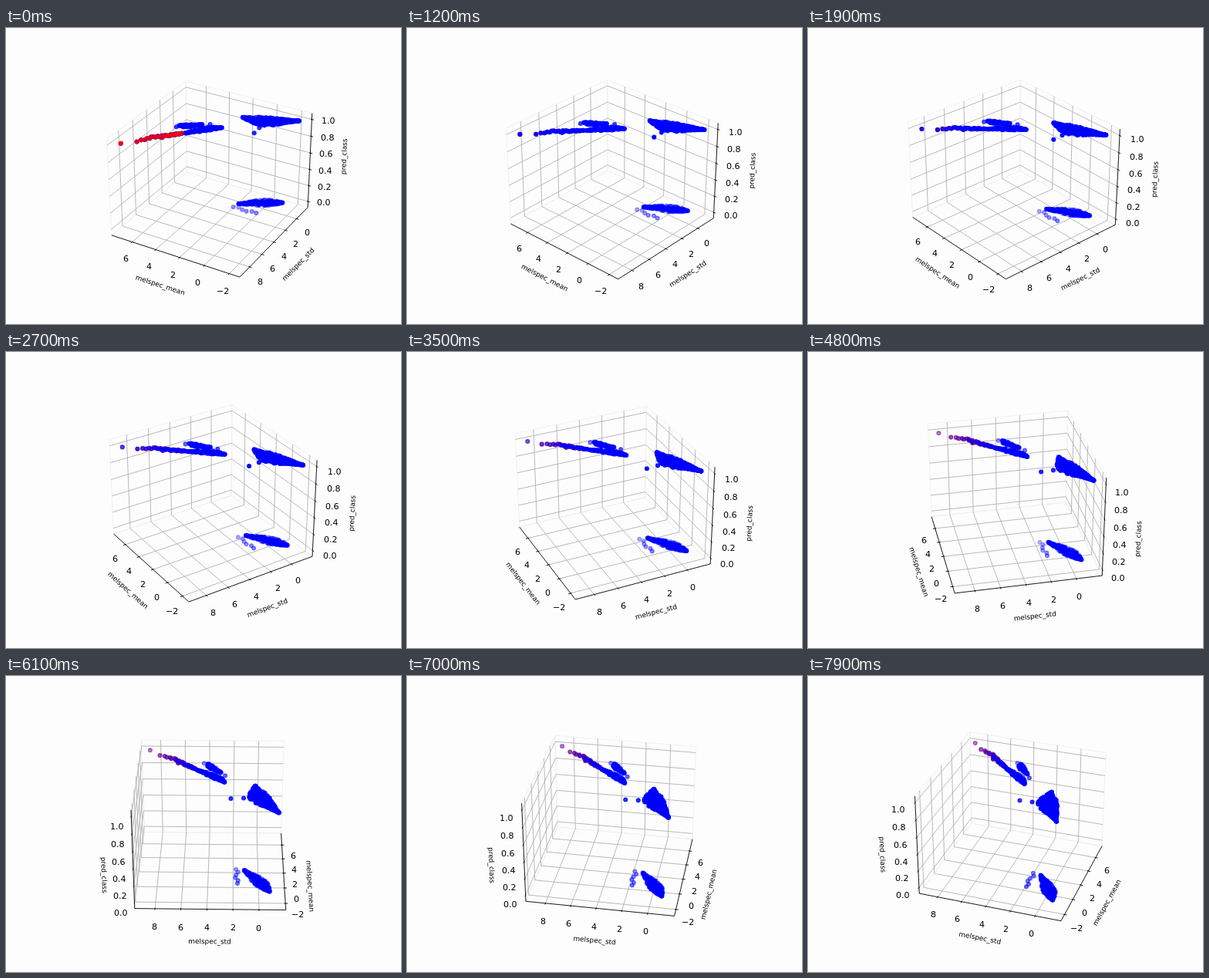
Write an HTML page with a canvas that moves like this. It is 512 px wide and 384 px high and loops after 8 s.

```html
<!DOCTYPE html>
<html lang="en">
<head>
<meta charset="utf-8">
<title>Rotating 3D scatter plot</title>
<style>
  html, body { margin: 0; width: 100%; height: 100%; overflow: hidden; background: #fdfdfd; }
  canvas { display: block; }
</style>
</head>
<body>
<canvas id="stage" width="512" height="384"></canvas>
<script>
const ctx = document.getElementById('stage').getContext('2d');
const FONT = '"DejaVu Sans", sans-serif';
const STEP = 100, STEPS = 80, START = 120;
const CENTER = [266.39, 189.93], SCALE = 1598.27, DIST = 10;
const ELEV = Math.PI / 6, SIN_E = Math.sin(ELEV), COS_E = Math.cos(ELEV);

// Half box sizes, box edge after padding, and one twelfth of each side
const HALF = [0.5714, 0.5714, 0.4286];
const EDGE = HALF.map(h => h * 25 / 24);
const DELTA = HALF.map(h => h / 6);
const TOP = HALF[2] / 1.1, REACH = HALF[0] / 1.1;

// flip: coordinate mirrored to reach the visible edge; out: direction of the tick marks
const AXES = [
  { label: 'melspec_mean', min: -2.615, max: 7.565, step: 2, digits: 0, flip: 1, out: 1 },
  { label: 'melspec_std', min: -1.83, max: 9.33, step: 2, digits: 0, flip: 0, out: 0 },
  { label: 'pred_class', min: -0.05, max: 1.05, step: 0.2, digits: 1, flip: 0, out: 0 }
];

let seed = 20;
function rand() {
  seed = (seed * 1664525 + 1013904223) >>> 0;
  return seed / 4294967296;
}

// Points spread along a line, fanning out sideways between low and high and closing at both ends
function streak({ count, from, to, low, high, z = TOP, pack = 1, skew = 1 }) {
  const dx = to[0] - from[0], dy = to[1] - from[1], len = Math.hypot(dx, dy);
  return Array.from({ length: count }, (_, i) => {
    const t = (i / (count - 1)) ** pack;
    const side = (low + (high - low) * rand()) * Math.sin(Math.PI * t ** skew) / len;
    return [from[0] + dx * t - dy * side, from[1] + dy * t + dx * side, z];
  });
}

const red = streak({ count: 36, from: [REACH, REACH], to: [0.19, 0.135], low: -0.026, high: 0.026, pack: 0.39 });

const blue = [
  ...red,
  ...streak({ count: 55, from: [0.28, 0.035], to: [0.13, -0.075], low: -0.036, high: 0.012, skew: 0.7 }),
  ...streak({ count: 100, from: [0.17, 0.12], to: [-0.035, -0.105], low: -0.016, high: 0.045, skew: 1.3 }),
  ...streak({ count: 300, from: [-REACH, -REACH], to: [-0.093, -0.347], low: -0.03, high: 0.12, skew: 1.3 }),
  ...streak({ count: 230, from: [-0.105, -0.27], to: [-0.42, -0.47], low: -0.042, high: 0.06, skew: 1.3, z: -TOP }),
  ...streak({ count: 6, from: [-0.094, -0.202], to: [-0.304, -0.214], low: -0.02, high: 0.04, z: -TOP }),
  // lone points
  [-0.302, -0.155, TOP], [-0.295, -0.254, TOP], [0.075, -0.108, TOP], [0.288, 0.065, TOP]
];

let cosA, sinA;

function project([x, y, z]) {
  const right = -sinA * x + cosA * y;
  const near = cosA * x + sinA * y;
  const depth = DIST - near * COS_E - z * SIN_E;
  const up = z * COS_E - near * SIN_E;
  return [CENTER[0] + SCALE * right / depth, CENTER[1] - SCALE * up / depth, depth];
}

function line(points, color, close) {
  ctx.beginPath();
  points.map(project).forEach(([x, y]) => ctx.lineTo(x, y));
  if (close) ctx.closePath();
  ctx.strokeStyle = color;
  ctx.lineWidth = 0.89;
  ctx.stroke();
}

const withCoord = (p, i, v) => p.map((c, k) => k === i ? v : c);
const flipped = (p, i) => withCoord(p, i, -p[i]);
const outward = (p, skip, n) => p.map((c, i) => i === skip ? c : c + Math.sign(c) * n * DELTA[i]);

function drawPanes(far) {
  for (let i = 0; i < 3; i++) {
    const j = (i + 1) % 3, k = (i + 2) % 3;
    const a = flipped(far, j), b = flipped(far, k);
    line([far, a, flipped(a, k), b], '#f0f0f0', true);
  }
}

function drawTick(axis, i, far, start, v) {
  const pos = ((v - axis.min) / (axis.max - axis.min) * 2 - 1) * HALF[i];
  const back = withCoord(far, i, pos), p = withCoord(start, i, pos);
  line([flipped(back, (i + 1) % 3), back, flipped(back, (i + 2) % 3)], '#b0b0b0');

  const o = axis.out, side = Math.sign(p[o]) * DELTA[o];
  line([withCoord(p, o, p[o] - 0.1 * side), withCoord(p, o, p[o] + 0.2 * side)], '#000');

  const text = v.toFixed(axis.digits).replace('-', '\u2212');
  const [x, y] = project(outward(p, i, 1.037));
  ctx.font = '11.11px ' + FONT;
  ctx.textAlign = 'left';
  ctx.fillText(text, Math.round(x - ctx.measureText(text).width / 2), Math.round(y + 8));
}

function drawLabel(axis, i, start, end) {
  const a = project(start), b = project(end);
  let angle = Math.atan2(b[1] - a[1], b[0] - a[0]);
  if (angle >= Math.PI / 2) angle -= Math.PI;
  if (angle < -Math.PI / 2) angle += Math.PI;
  const [x, y] = project(outward(withCoord(start, i, 0), i, 2.255));
  ctx.save();
  ctx.translate(x, y);
  ctx.rotate(angle);
  ctx.font = '8.89px ' + FONT;
  ctx.textAlign = 'center';
  ctx.fillText(axis.label, 0, 2.4 - 1.6 * Math.max(0, Math.sin(angle)));
  ctx.restore();
}

function drawAxis(axis, i, far) {
  const start = flipped(far, axis.flip), end = flipped(start, i);
  ctx.fillStyle = '#000';
  for (let n = Math.ceil(axis.min / axis.step); n * axis.step <= axis.max; n++) {
    drawTick(axis, i, far, start, n * axis.step);
  }
  line([start, end], '#000');
  drawLabel(axis, i, start, end);
}

// Far points first, fading with depth
function drawPoints({ dots, color }) {
  const near = -1 / dots[dots.length - 1][2], far = -1 / dots[0][2];
  ctx.fillStyle = ctx.strokeStyle = color;
  ctx.lineWidth = 1.11;
  for (const [x, y, d] of dots) {
    ctx.globalAlpha = 1 - 0.7 * (-1 / d - near) / (far - near);
    ctx.beginPath();
    ctx.arc(x, y, 2.485, 0, 2 * Math.PI);
    ctx.fill();
    ctx.stroke();
  }
  ctx.globalAlpha = 1;
}

function draw(step) {
  const azim = (START + step) * Math.PI / 180;
  cosA = Math.cos(azim);
  sinA = Math.sin(azim);
  ctx.fillStyle = '#fdfdfd';
  ctx.fillRect(0, 0, 512, 384);

  const far = [EDGE[0], START + step <= 180 ? -EDGE[1] : EDGE[1], -EDGE[2]];
  drawPanes(far);
  AXES.forEach((axis, i) => drawAxis(axis, i, far));

  // The set holding the nearest point goes on top
  const sets = [[blue, '#00f'], [red, '#f00']].map(([points, color]) => ({
    color, dots: points.map(project).sort((a, b) => b[2] - a[2])
  }));
  const nearest = set => set.dots[set.dots.length - 1][2];
  sets.sort((a, b) => nearest(b) - nearest(a)).forEach(drawPoints);
}

const begin = performance.now();
let shown = -1;
function tick() {
  const step = Math.floor((performance.now() - begin) / STEP) % STEPS;
  if (step !== shown) draw(shown = step);
  requestAnimationFrame(tick);
}
tick();
</script>
</body>
</html>
```
